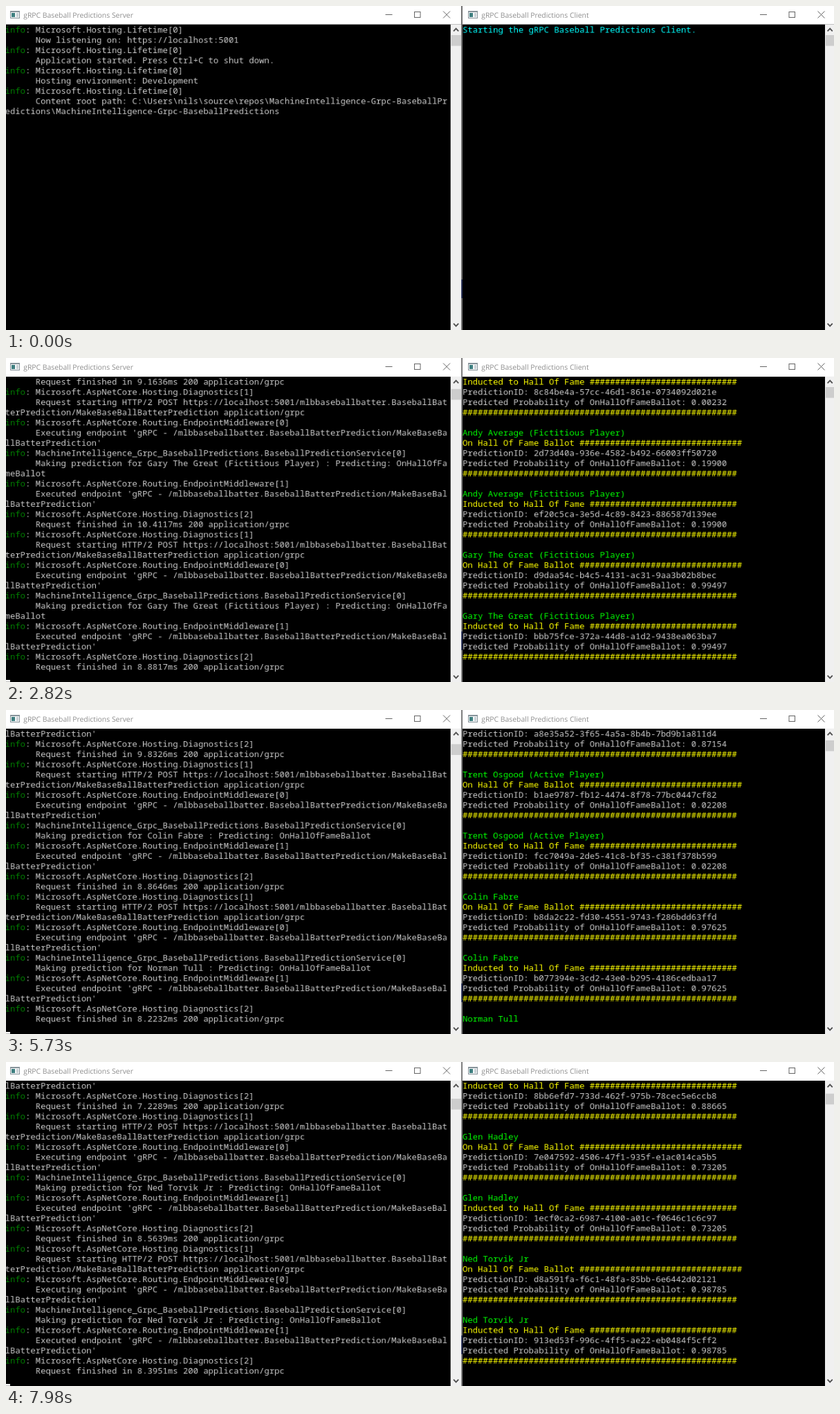
Recreate the animation shown at these times as an HTML page with a canvas. Size 1197x468 px, loop 8 s.

```html
<!DOCTYPE html>
<html lang="en">
<head>
<meta charset="utf-8">
<title>gRPC Baseball Predictions</title>
<style>
  html, body { margin: 0; width: 100%; height: 100%; overflow: hidden; background: #000; }
  canvas { display: block; }
</style>
</head>
<body>
<canvas id="stage" width="1197" height="468"></canvas>
<script>
const ctx = document.getElementById('stage').getContext('2d');
const LOOP = 8000;
const ZOOM = 0.919;          // the desktop is shown slightly reduced
const CELL_W = 8, CELL_H = 16;
const COLS = 87, ROWS = 29;
const TOP = 26.6;            // lower edge of the title bars
const GRAY = '#cccccc', GREEN = '#00ff00', YELLOW = '#ffff00', CYAN = '#00ffff';

// name, probability, two prediction ids, two request durations
const players = [
  ['Barry Badd (Fictitious Player)', '0.00232', 'c04510b6-e95d-408e-8434-02bbc58a0ce9', '8c84be4a-57cc-46d1-861e-0734092d021e', '822.7818', '9.671'],
  ['Andy Average (Fictitious Player)', '0.19900', '2d73d40a-936e-4582-b492-66003ff50720', 'ef20c5ca-3e5d-4c89-8423-886587d139ee', '9.4215', '9.1636'],
  ['Gary The Great (Fictitious Player)', '0.99497', 'd9daa54c-b4c5-4131-ac31-9aa3b02b8bec', 'bbb75fce-372a-44d8-a1d2-9438ea063ba7', '10.4117', '8.8817'],
  ['Martin Colwyn', '0.87154', '06d634fa-9b88-4466-825c-6d5c21d0dcdf', 'a8e35a52-3f65-4a5a-8b4b-7bd9b1a811d4', '8.6132', '7.4708'],
  ['Trent Osgood (Active Player)', '0.02208', 'b1ae9787-fb12-4474-8f78-77bc0447cf82', 'fcc7049a-2de5-41c8-bf35-c381f378b599', '9.0248', '8.3174'],
  ['Colin Fabre', '0.97625', 'b8da2c22-fd30-4551-9743-f286bdd63ffd', 'b077394e-3cd2-43e0-b295-4186cedbaa17', '9.8326', '8.8646'],
  ['Norman Tull', '0.99833', 'aba10f2c-19c3-4fb1-90ce-c187256f7f6a', '2b5caa7a-54b3-428b-8254-fa701f36b403', '8.2232', '8.7405'],
  ['Pablo Renzi', '0.88665', '96148064-c7f1-4e7b-a570-5368380729b1', '8bb6efd7-733d-462f-975b-78cec5e6ccb8', '9.5692', '8.5227'],
  ['Glen Hadley', '0.73205', '7e047592-4506-47f1-935f-e1ac014ca5b5', '1ecf0ca2-6987-4100-a01c-f0646c1c6c97', '8.0251', '7.2289'],
  ['Ned Torvik Jr', '0.98785', 'd8a591fa-f6c1-48fa-85bb-6e6442d02121', '913ed53f-996c-4ff5-ae22-eb0484f5cff2', '8.5639', '8.3951']
];

// time, finished requests, extra server entries, extra client lines
const steps = [
  [0, 0, 0, 0], [430, 0, 1, 0], [510, 0, 2, 0], [580, 0, 3, 0],
  [1290, 1, 0, 0], [1350, 2, 0, 0], [2060, 4, 0, 0],
  [2760, 5, 0, 0], [2820, 6, 0, 0], [3530, 8, 0, 0],
  [4240, 9, 1, 0], [4310, 10, 0, 0], [5020, 12, 0, 0],
  [5730, 13, 0, -5], [5800, 14, 0, 0], [6500, 16, 0, 0],
  [7210, 17, 0, -5], [7280, 18, 0, 0], [7980, 20, 0, 0]
];

const entries = [];          // server log, each entry a list of wrapped rows
const client = [];           // client rows as [text, colour]

function log(source, message) {
  const rows = ['info: ' + source];
  const text = ' '.repeat(6) + message;
  for (let i = 0; i < text.length; i += COLS) rows.push(text.slice(i, i + COLS));
  entries.push(rows);
}

function buildLogs() {
  const host = 'Microsoft.Hosting.Lifetime[0]';
  const web = 'Microsoft.AspNetCore.';
  const route = 'mlbbaseballbatter.BaseballBatterPrediction/MakeBaseBallBatterPrediction';
  const project = 'MachineIntelligence-Grpc-BaseballPredictions';
  log(host, 'Now listening on: https://localhost:5001');
  log(host, 'Application started. Press Ctrl+C to shut down.');
  log(host, 'Hosting environment: Development');
  log(host, 'Content root path: C:\\Users\\nils\\source\\repos\\' + project + '\\' + project);
  client.push(['Starting the gRPC Baseball Predictions Client.', CYAN], ['', GRAY]);

  for (const [name, odds, id1, id2, ms1, ms2] of players) {
    const runs = [
      ['On Hall Of Fame Ballot ' + '#'.repeat(32), id1, ms1],
      ['Inducted to Hall Of Fame ' + '#'.repeat(29), id2, ms2]
    ];
    for (const [heading, id, ms] of runs) {
      log(web + 'Hosting.Diagnostics[1]', `Request starting HTTP/2 POST https://localhost:5001/${route} application/grpc`);
      log(web + 'Routing.EndpointMiddleware[0]', `Executing endpoint 'gRPC - /${route}'`);
      log('MachineIntelligence_Grpc_BaseballPredictions.BaseballPredictionService[0]',
        `Making prediction for ${name} : Predicting: OnHallOfFameBallot`);
      log(web + 'Routing.EndpointMiddleware[1]', `Executed endpoint 'gRPC - /${route}'`);
      log(web + 'Hosting.Diagnostics[2]', `Request finished in ${ms}ms 200 application/grpc`);
      client.push([name, GREEN], [heading, YELLOW], ['PredictionID: ' + id, GRAY],
        ['Predicted Probability of OnHallOfFameBallot: ' + odds, GRAY],
        ['#'.repeat(54), YELLOW], ['', GRAY]);
    }
  }
}

// A console is drawn on its full-size cell grid, then reduced onto the stage.
function makeConsole(x, width) {
  const canvas = document.createElement('canvas');
  canvas.width = width;
  canvas.height = CELL_H * (ROWS + 2);
  const pen = canvas.getContext('2d', { alpha: false });
  return {
    clear() {
      pen.fillStyle = '#000';
      pen.fillRect(0, 0, width, canvas.height);
      pen.font = '500 13.3333px "Noto Sans Mono", "DejaVu Sans Mono", monospace';
    },
    put(text, col, row, color) {
      pen.fillStyle = color;
      pen.fillText(text, col * CELL_W, row * CELL_H + 13);
    },
    cursor(row) {
      pen.fillStyle = '#fff';
      pen.fillRect(0, row * CELL_H + 13, CELL_W, 3);
    },
    show() {
      ctx.drawImage(canvas, x, TOP, width * ZOOM, canvas.height * ZOOM);
    }
  };
}

const serverView = makeConsole(-1.4, 704);
const clientView = makeConsole(660, 572);

function box(x, y, w, h, color) {
  ctx.fillStyle = color;
  ctx.fillRect(x, y, w, h);
}

function stroke(color, width, ...paths) {
  ctx.strokeStyle = color;
  ctx.lineWidth = width;
  ctx.beginPath();
  for (const [start, ...rest] of paths) {
    ctx.moveTo(...start);
    rest.forEach(p => ctx.lineTo(...p));
  }
  ctx.stroke();
}

function icon(x) {
  box(x, 7, 14, 11, '#87939a');
  box(x + 1, 9, 12, 8, '#f4f6f7');
  box(x + 2, 10, 5, 6, '#3d7f80');
  box(x + 9, 10, 3, 6, '#c9d1d6');
}

function titleBar(x, w, pad, text, [low, max, close]) {
  box(x, 0, w, TOP, '#fff');
  icon(x + pad);
  ctx.font = '10.4px "Open Sans", "Noto Sans", sans-serif';
  ctx.fillStyle = '#8e8e8e';
  ctx.fillText(text, x + pad + 19.2, 16.6);
  stroke('#666', 1, [[low - 5, 12.5], [low + 5, 12.5]]);
  ctx.strokeRect(max - 4.5, 8.5, 8.5, 8);
  stroke('#666', 1, [[close - 5, 7.5], [close + 5, 17.5]], [[close + 5, 7.5], [close - 5, 17.5]]);
}

function scrollBar(x, w, mid, top) {
  box(x, TOP, w, 442, '#f0f0f0');
  box(x + 1, 42 + Math.round(top * 0.048) * ZOOM, w - 1.5, 15.6, '#cdcdcd');
  const chevron = (y, d) => [[mid - 3.6, y + d], [mid, y - d], [mid + 3.6, y + d]];
  stroke('#505050', 1.8, chevron(34.5, 1.9), chevron(460.5, -1.9));
}

function drawServer(count, cursor) {
  const rows = entries.slice(0, count).flat();
  const top = Math.max(0, rows.length - ROWS);
  serverView.clear();
  rows.slice(top).forEach((text, i) => {
    const tag = text.startsWith('info:') ? 4 : 0;
    serverView.put(text.slice(0, tag), 0, i, '#008000');
    serverView.put(text.slice(tag), tag, i, GRAY);
  });
  if (cursor) serverView.cursor(rows.length - top);
  serverView.show();
  scrollBar(642.7, 15.6, 650.6, top);
}

function drawClient(count) {
  const top = Math.max(0, count - ROWS);
  clientView.clear();
  client.slice(top, count).forEach(([text, color], i) => clientView.put(text, 0, i, color));
  clientView.show();
  scrollBar(1184, 14, 1191.2, top);
}

function render([time, done, extraLog, extraRows]) {
  ctx.textRendering = 'geometricPrecision';
  ctx.imageSmoothingQuality = 'high';
  drawServer(4 + done * 5 + extraLog, time > 0);
  drawClient(2 + done * 6 + extraRows);
  titleBar(0, 658.3, 6, 'gRPC Baseball Predictions Server', [553.5, 595, 637]);
  titleBar(660, 537, 8, 'gRPC Baseball Predictions Client', [1095, 1136.5, 1178.5]);
  box(658.3, 0, 1.7, 468, '#777');
  box(658.3, 395, 1.7, 27, '#26305a');
}

let shown = null;
const start = performance.now();

function tick() {
  const t = (performance.now() - start) % LOOP;
  const step = steps.findLast(s => s[0] <= t);
  if (step !== shown) render(shown = step);
  requestAnimationFrame(tick);
}

buildLogs();
tick();
</script>
</body>
</html>
```
